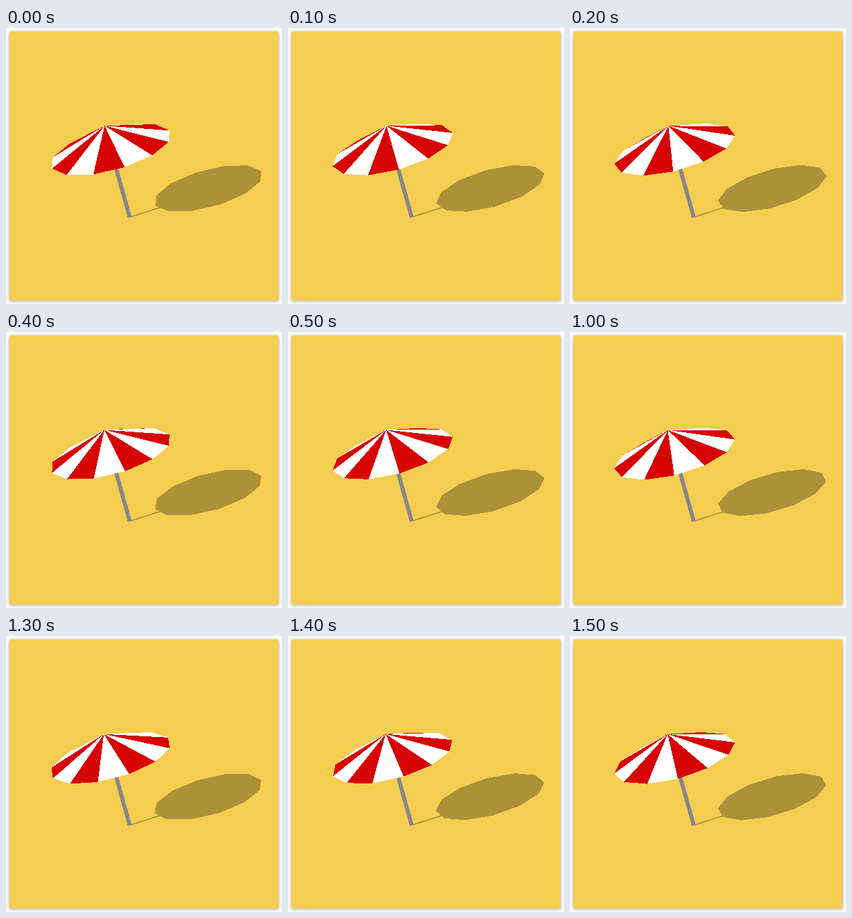
Animation of 410 by 410 pixels, one loop 1.6 s. Source, as an HTML page:

```html
<!DOCTYPE html>
<html lang="en">
<head>
<meta charset="utf-8">
<title>Parasol</title>
<style>
  html, body { margin: 0; width: 100%; height: 100%; overflow: hidden; background: #fff; }
  .card {
    position: absolute; left: 5px; top: 5px; width: 400px; height: 400px;
    border-radius: 2px; background: #f5cd51; box-shadow: 0 1px 5px rgba(0, 0, 0, .35);
  }
  svg { position: absolute; left: 0; top: 0; display: block; }
</style>
</head>
<body>
<div class="card"></div>
<svg width="410" height="410" viewBox="0 0 410 410" shape-rendering="crispEdges">
  <path d="M184 281L240 263" stroke="#ac9139" stroke-width="1.7"/>
  <path id="shade" fill="#ac9139"/>
  <path d="M183.8 281.2L150 160" stroke="#88888a" stroke-width="6"/>
  <path id="white" fill="#fff"/>
  <path id="red" fill="#d60404"/>
</svg>
<script>
const LOOP = 1600, SIDES = 12;
const SLOW_FROM = 700, SLOW_TO = 1300, LAG = 140;

// rim ellipses: center, two conjugate radii, turn in degrees per ms
const CANOPY = { c: [155.7, 180.6], a: [-87.5, 28.3], b: [20.5, 26.3], speed: -0.0735 };
const SHADOW = { c: [300.6, 238.3], a: [-78.5, 25.7], b: [18.5, 23.6], speed: -0.0795 };

const [shade, white, red] = ['shade', 'white', 'red'].map(id => document.getElementById(id));
const poly = pts => 'M' + pts.map(p => p.map(n => n.toFixed(2)).join(' ')).join('L') + 'Z';

function rim({ c, a, b, speed }, time, dx, dy) {
  return Array.from({ length: SIDES }, (_, k) => {
    const angle = (speed * time + k * 360 / SIDES) * Math.PI / 180;
    const cos = Math.cos(angle), sin = Math.sin(angle);
    return [c[0] + dx + a[0] * cos + b[0] * sin, c[1] + dy + a[1] * cos + b[1] * sin];
  });
}

const facing = (o, p, q) =>
  (p[0] - o[0]) * (q[1] - o[1]) - (p[1] - o[1]) * (q[0] - o[0]) < 0;

// The pose is held for 100 ms, or 300 ms in the slow stretch, which also loses some time.
function poseTime(t) {
  const hold = t >= SLOW_FROM && t < SLOW_TO ? 300 : 100;
  const held = t - (t + 2 * LOOP - SLOW_FROM) % hold;
  return t < SLOW_FROM || hold === 300 ? snap(t, hold) : snap(t, hold) - LAG;
}

function snap(t, hold) {
  return SLOW_FROM + Math.floor((t - SLOW_FROM) / hold) * hold;
}

function draw(time) {
  const drift = time / LOOP;
  const apex = [146.5 - 1.8 * drift, 145.2 + 0.7 * drift];
  const edge = rim(CANOPY, time, -0.5 * drift, 0.8 * drift);
  let all = '', striped = '';
  edge.forEach((p, k) => {
    const q = edge[(k + 1) % SIDES];
    if (!facing(apex, p, q)) return;
    const panel = poly([apex, p, q]);
    all += panel;
    if (k % 2 === 0) striped += panel;
  });
  white.setAttribute('d', all);
  red.setAttribute('d', striped);
  shade.setAttribute('d', poly(rim(SHADOW, time, -0.6 * drift, 0.6 * drift)));
}

const start = performance.now();
function tick(now) {
  draw(poseTime(Math.max(0, now - start) % LOOP));
  requestAnimationFrame(tick);
}
tick(start);
</script>
</body>
</html>
```
